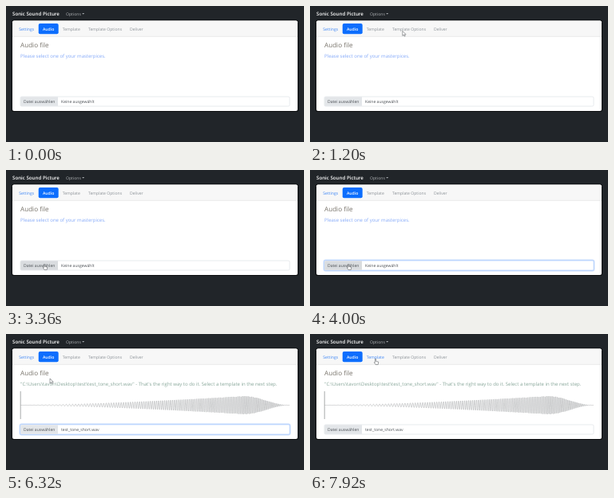
Recreate the animation shown at these times as an HTML page. Size 373 by 171 pixels, loop 8000 ms.

```html
<!DOCTYPE html>
<html lang="de">
<head>
<meta charset="utf-8">
<title>Audio file</title>
<style>
  html, body { margin: 0; width: 100%; height: 100%; overflow: hidden; background: #212529; }
  svg { display: block; width: 373px; height: 171px; }
  text { font-family: "Open Sans", "Noto Sans", sans-serif; font-size: 5.1px; text-rendering: geometricPrecision; white-space: pre; }
  .brand { font-size: 6.18px; font-weight: 600; fill: #fff; }
  .menu { fill: #b0b3b6; }
  .tab { fill: #8b9197; }
  .tab.link { fill: #3d86f5; }
  .tab.active { fill: #fff; font-weight: 600; }
  .title { font-size: 8.15px; fill: #77726a; }
  .note { font-size: 6px; fill: #84a9f8; }
  .note.done { fill: #86a598; }
  .field { fill: #4c5156; }
</style>
</head>
<body>
<svg viewBox="0 0 373 171">
  <rect width="373" height="171" fill="#212529"/>
  <text class="brand" x="8" y="12.4">Sonic Sound Picture</text>
  <text class="menu" x="75" y="12">Options</text>
  <path d="M95.2 8.9h3l-1.5 1.6z" fill="#b0b3b6"/>

  <rect x="7" y="17.5" width="359" height="115.5" rx="2.6" fill="#0c0e10"/>
  <rect x="8" y="18.5" width="357" height="113.5" rx="2" fill="#fff"/>
  <path d="M8 38.3V20.5q0-2 2-2H363q2 0 2 2V38.3z" fill="#f7f7f7"/>
  <path d="M8 38.3H365" stroke="#d5d6d7" stroke-width=".5"/>

  <rect x="40.7" y="21.9" width="25" height="13.4" rx="2" fill="#0d6efd" stroke="#fff" stroke-width="1" paint-order="stroke"/>
  <text class="tab link" x="16.3" y="30.6">Settings</text>
  <text class="tab active" x="46" y="30.6">Audio</text>
  <text class="tab" id="template" x="70.8" y="30.6">Template</text>
  <text class="tab" x="103" y="30.6">Template Options</text>
  <text class="tab" x="155" y="30.6">Deliver</text>

  <text class="title" x="18" y="52.4">Audio file</text>
  <text class="note" id="note" x="18" y="65.2"></text>

  <g id="wave" fill="none" stroke="#a0a2a4">
    <path d="M18.2 72V107" stroke-width=".9"/>
    <path id="tone" stroke-width=".5"/>
  </g>

  <rect id="ring" x="17.3" y="113.3" width="338.4" height="13.4" rx="2.2" fill="none" stroke="#c6dbfc" stroke-width="1.4"/>
  <rect id="box" x="18" y="114" width="337" height="12" rx="1.7" fill="#fff" stroke-width=".5"/>
  <path id="button" d="M65 114.2H19.7q-1.5 0-1.5 1.5v8.6q0 1.5 1.5 1.5H65z"/>
  <text class="field" x="22" y="121.9">Datei auswählen</text>
  <text class="field" id="file" x="69" y="121.9"></text>

  <g id="cursor" stroke="#44484c" stroke-width=".5" stroke-linejoin="round" fill="#fff">
    <path id="arrow" d="M0 0V6L1.4 4.7 2.4 6.8 3.4 6.3 2.5 4.4H4.3z"/>
    <path id="hand" d="M-.6 0H.6V2.8L3.8 3.6 3.2 7H.1L-1.7 4.2H-.6z"/>
  </g>
</svg>
<script>
  const LOOP = 8000, STEP = 80, ENTER = 720, PICKED = 6320;
  const $ = id => document.getElementById(id);
  const clamp = v => Math.min(1, Math.max(0, v));
  const within = (t, a, b) => t >= a && t < b;

  const moves = [
    { start: ENTER, time: 800, x: 121, y: 47 },
    { start: 1760, time: STEP, x: 203, y: 154 },
    { start: 2160, time: STEP, x: 184, y: 165 },
    { start: 2480, time: 880, x: 48, y: 118.5 },
    { start: 4480, time: 400, x: 57, y: 48 },
    { start: 5520, time: 240, x: 55, y: 56 },
    { start: 7200, time: 640, x: 82, y: 31.5 }
  ];

  function cursorAt(t) {
    const pos = { x: 108, y: 8 };
    for (const { start, time, x, y } of moves) {
      const p = clamp((t - start) / time);
      pos.x += (x - pos.x) * p;
      pos.y += (y - pos.y) * p;
    }
    return pos;
  }

  // Rises before `on` and falls before `off`
  const glowBetween = (t, on, off, fade = 160) =>
    clamp((t - on) / fade + 1) * clamp((off - t) / fade);

  // A chirp that swells, then closes quickly
  function tonePath() {
    const left = 18, width = 337, peak = .83, points = [];
    for (let x = 0; x <= width; x += .2) {
      const u = x / width;
      const size = u < peak
        ? 11.5 * (u / peak) ** 1.5
        : 11.5 * Math.cos(Math.PI / 2 * (u - peak) / (1 - peak)) ** 2;
      const y = 89.5 - size * Math.sin(2 * Math.PI * (60 * u + 70 * u * u));
      points.push((left + x).toFixed(1) + " " + y.toFixed(2));
    }
    return "M" + points.join("L");
  }

  const show = (id, on) => $(id).setAttribute("visibility", on ? "visible" : "hidden");

  function draw(time) {
    const t = Math.floor(time % LOOP / STEP) * STEP;
    const picked = t >= PICKED;
    const hand = within(t, 3200, 4560) || t >= 7760;
    const seen = t >= ENTER && !within(t, 2320, 2560);
    const glow = glowBetween(t, 3920, 4240) + glowBetween(t, PICKED, 7840);
    const { x, y } = cursorAt(t);

    $("note").textContent = picked
      ? "\"C:\\Users\\tavon\\Desktop\\test\\test_tone_short.wav\" - That's the right way to do it. Select a template in the next step."
      : "Please select one of your masterpices.";
    $("note").classList.toggle("done", picked);
    $("file").textContent = picked ? "test_tone_short.wav" : "Keine ausgewählt";
    $("template").classList.toggle("link", t > PICKED);
    show("wave", picked);

    $("button").style.fill = within(t, 3200, 4960) ? "#d9dcdf" : "#e3e6e9";
    $("box").style.stroke = glow > .5 ? "#9cc3fc" : "#ced4da";
    $("ring").setAttribute("opacity", glow);

    $("cursor").setAttribute("transform", `translate(${x} ${y})`);
    show("arrow", seen && !hand);
    show("hand", seen && hand);
  }

  $("tone").setAttribute("d", tonePath());
  const start = performance.now();
  function tick() {
    draw(performance.now() - start);
    requestAnimationFrame(tick);
  }
  tick();
</script>
</body>
</html>
```
